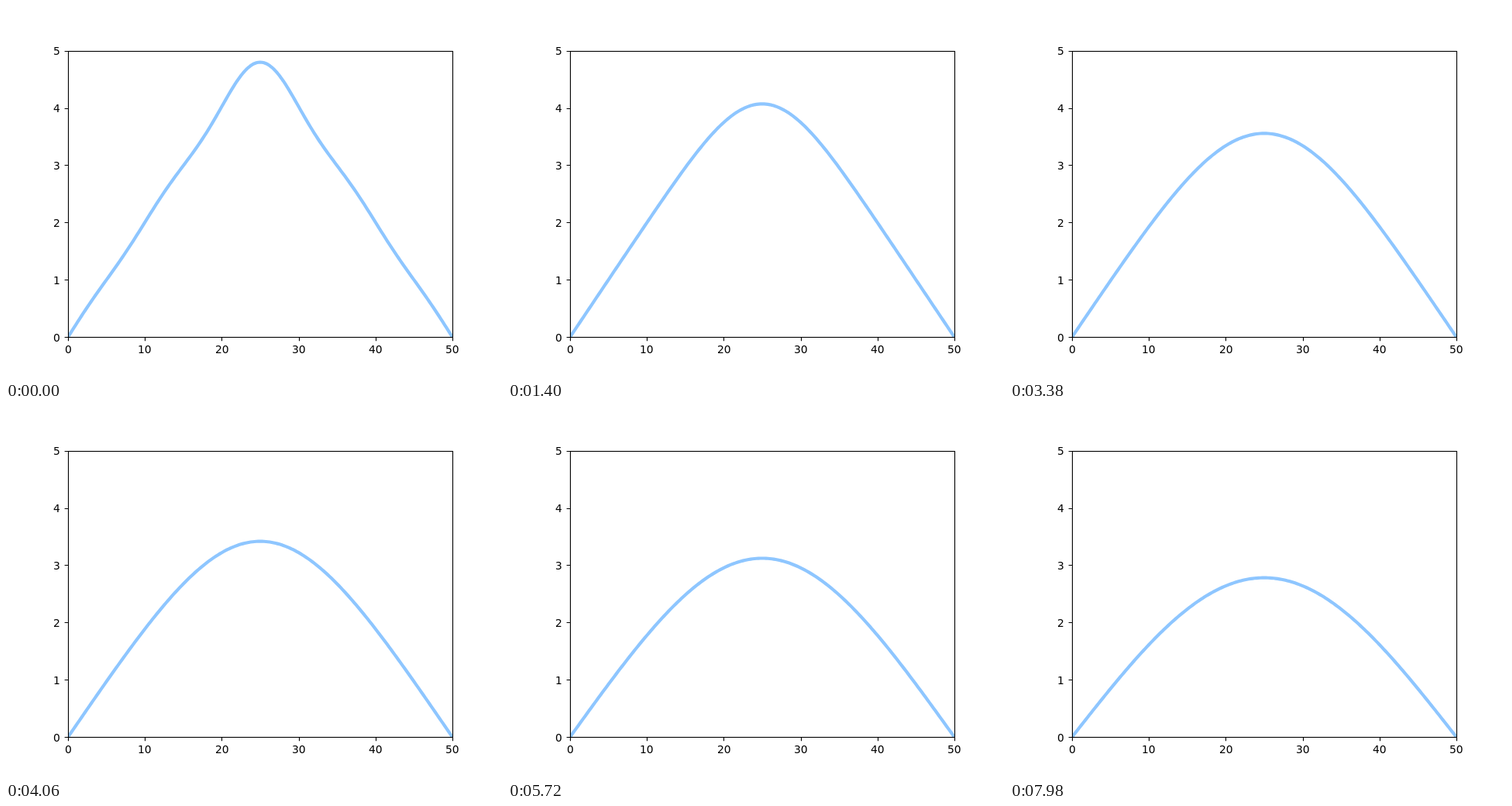
Recreate the animation shown at these times as an HTML page. Size 640 by 480 pixels, loop 8 s.

```html
<!DOCTYPE html>
<html lang="en">
<head>
<meta charset="utf-8">
<title>Heat diffusion</title>
<style>
  html, body { margin: 0; width: 100%; height: 100%; overflow: hidden; background: #fff; }
  svg { display: block; width: 640px; height: 480px; }
  text { font: 13.889px "DejaVu Sans", sans-serif; fill: #000; }
  .axis { fill: none; stroke: #000; stroke-width: 1.11; }
  #curve { fill: none; stroke: #8ec6ff; stroke-width: 4.17; stroke-linejoin: round; }
</style>
</head>
<body>
<svg viewBox="0 0 640 480">
  <clipPath id="plot"><rect x="80" y="57.6" width="496" height="369.6"/></clipPath>
  <path id="curve" clip-path="url(#plot)"/>
  <path id="ticks" class="axis"/>
  <rect class="axis" x="80.5" y="58.5" width="496" height="369"/>
  <g id="labels"></g>
</svg>
<script>
const LOOP = 8000, STEP = 20, DECAY = 0.000957;
const LENGTH = 50, HEIGHT = 5, MODES = [1, 3, 5, 7, 9];
const $ = id => document.getElementById(id);
const px = x => 80 + x * 496 / LENGTH;
const py = y => 427.2 - y * 369.6 / HEIGHT;
const snap = v => Math.floor(v + 0.5) + 0.5;

function label(str, x, y) {
  const el = document.createElementNS("http://www.w3.org/2000/svg", "text");
  el.setAttribute("x", Math.round(x));
  el.setAttribute("y", Math.round(y));
  el.textContent = str;
  $("labels").append(el);
}

function drawAxes() {
  const digit = 8.84;
  let d = "";
  for (let i = 0; i <= 5; i++) {
    const x = px(i * 10), y = py(i), name = String(i * 10);
    d += `M${snap(x)} 427.5v4.86M80.5 ${snap(y)}h-4.86`;
    label(name, x - name.length * digit / 2, 447.9);
    label(i, 70.28 - digit, y + 5.5);
  }
  $("ticks").setAttribute("d", d);
}

// Fourier solution of the heat equation for a triangular start
function heat(x, amps) {
  return MODES.reduce((sum, n, i) => sum + amps[i] * Math.sin(n * Math.PI * x / LENGTH), 0);
}

function draw(ms) {
  const step = Math.floor((ms % LOOP) / STEP);
  const amps = MODES.map((n, i) =>
    (i % 2 ? -1 : 1) * 8 * HEIGHT / (Math.PI * n) ** 2 * Math.exp(-DECAY * n * n * step));
  const points = [];
  for (let i = 0; i <= 200; i++) {
    const x = i * LENGTH / 200;
    points.push(px(x).toFixed(2) + " " + py(heat(x, amps)).toFixed(2));
  }
  $("curve").setAttribute("d", "M" + points.join("L"));
}

drawAxes();
draw(0);
const start = performance.now();
(function frame() {
  draw(performance.now() - start);
  requestAnimationFrame(frame);
})();
</script>
</body>
</html>
```
